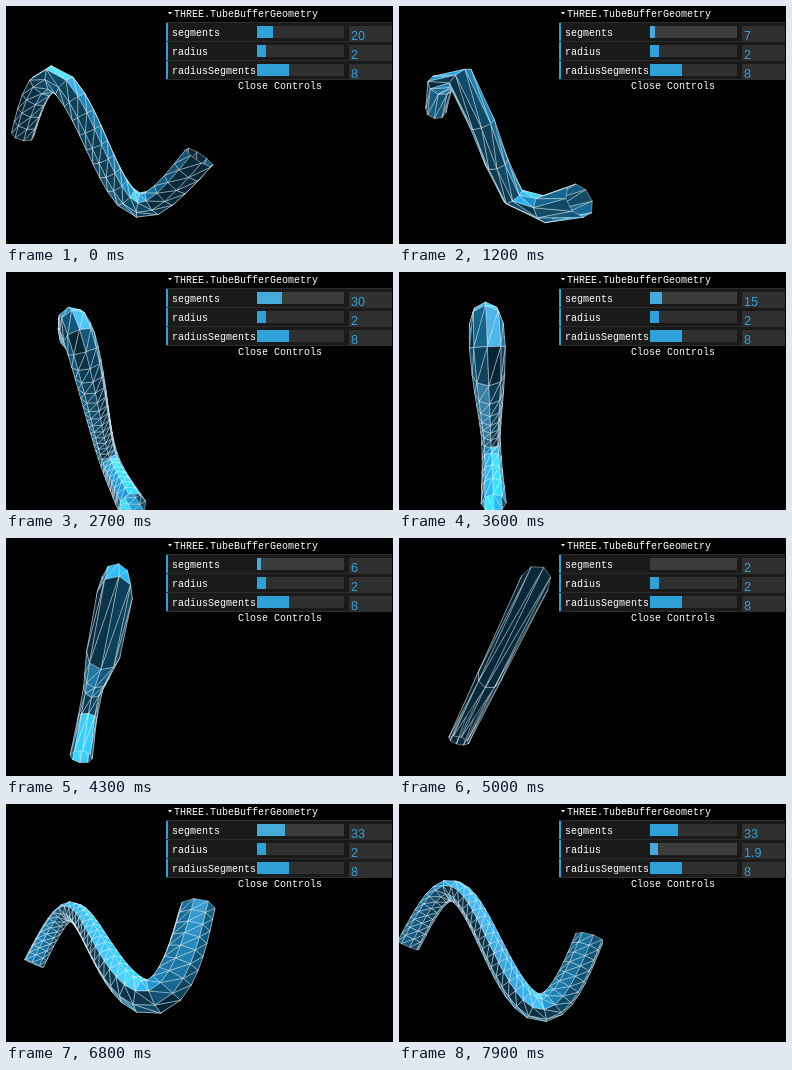
An HTML page with a canvas that plays this animation: 387 px wide and 238 px high, repeating every 8 s.

```html
<!DOCTYPE html>
<html lang="en">
<head>
<meta charset="utf-8">
<title>Tube geometry</title>
<style>
  html, body { margin: 0; width: 100%; height: 100%; overflow: hidden; background: #000; }
  canvas, svg { position: absolute; left: 0; top: 0; display: block; }
  text { font: 10px "Liberation Mono", monospace; fill: #fff; white-space: pre; }
  .value { font: 12.6px "Liberation Sans", Arial, sans-serif; fill: #2fa1d6; }
</style>
</head>
<body>
<canvas id="scene" width="387" height="238"></canvas>
<svg id="panel" width="387" height="238" viewBox="0 0 387 238"></svg>
<script>
const LOOP = 8000, STEP = 100;
const CENTER = { x: 90.8, y: 138.2 }, FOCAL = 182.7, CAMERA_Z = 30;
const START_ANGLE = -159.9, DEGREES_PER_SECOND = 18.75;
const DIFFUSE = [21, 98, 137], EMISSIVE = [7, 37, 52];
const LIGHTS = [[0, 200, 0], [100, 200, 100], [-100, -200, -100]];
const TAU = Math.PI * 2;

// [seconds, segments]
const SEGMENT_KEYS = [[0, 20], [0.3, 20], [1.2, 7], [1.9, 35], [2.4, 35], [3.6, 15],
  [4.5, 3], [4.8, 2], [5.4, 2], [6.6, 33], [8, 33]];

const ctx = document.getElementById('scene').getContext('2d');
const panel = document.getElementById('panel');

const sub = (a, b) => a.map((v, i) => v - b[i]);
const add = (a, b) => a.map((v, i) => v + b[i]);
const dot = (a, b) => a[0] * b[0] + a[1] * b[1] + a[2] * b[2];
const unit = a => {
  const length = Math.hypot(...a);
  return a.map(v => v / length);
};
const cross = (a, b) => [
  a[1] * b[2] - a[2] * b[1], a[2] * b[0] - a[0] * b[2], a[0] * b[1] - a[1] * b[0]];

function keyed(keys, t) {
  const i = Math.max(1, keys.findIndex(k => k[0] >= t));
  const [t0, v0] = keys[i - 1], [t1, v1] = keys[i];
  return v0 + (v1 - v0) * (t - t0) / (t1 - t0);
}

// Sine curve, sampled evenly by arc length
const curve = t => [30 * t - 15, 10 * Math.sin(TAU * t), 0];
const lengths = [0];
for (let i = 1; i <= 200; i++) {
  const d = sub(curve(i / 200), curve((i - 1) / 200));
  lengths.push(lengths[i - 1] + Math.hypot(...d));
}
function curveParam(u) {
  const goal = u * lengths[200];
  const i = Math.min(200, Math.max(1, lengths.findIndex(l => l >= goal)));
  return (i - 1 + (goal - lengths[i - 1]) / (lengths[i] - lengths[i - 1])) / 200;
}

function tubeRings(segments, radius, sides) {
  return Array.from({ length: segments + 1 }, (_, i) => {
    const t = curveParam(i / segments), p = curve(t);
    const [tx, ty] = unit([30, 10 * TAU * Math.cos(TAU * t), 0]);
    return Array.from({ length: sides + 1 }, (_, j) => {
      const v = j / sides * TAU, s = radius * Math.sin(v);
      return [p[0] - s * ty, p[1] + s * tx, radius * Math.cos(v)];
    });
  });
}

function rotate([x, y, z], angle) {
  const c = Math.cos(angle), s = Math.sin(angle);
  const z1 = z * c - x * s;
  return [x * c + z * s, y * c - z1 * s, y * s + z1 * c];
}

function project([x, y, z]) {
  const k = FOCAL / (CAMERA_Z - z);
  return [CENTER.x + x * k, CENTER.y - y * k];
}

function shade(normal, point, view) {
  let diffuse = 0, specular = 0;
  for (const light of LIGHTS) {
    const dir = unit(sub(light, point));
    const lambert = Math.max(0, dot(normal, dir));
    const half = Math.max(0, dot(normal, unit(add(dir, view))));
    diffuse += lambert;
    specular += 68 * lambert * half ** 30;
  }
  const rgb = DIFFUSE.map((d, i) => Math.min(255, Math.round(EMISSIVE[i] + d * diffuse + specular)));
  return `rgb(${rgb})`;
}

function makeFace(points) {
  const [a, b, c] = points;
  const mid = add(add(a, b), c).map(v => v / 3);
  const toCamera = sub([0, 0, CAMERA_Z], mid);
  let normal = unit(cross(sub(b, a), sub(c, a)));
  if (dot(normal, toCamera) < 0) normal = normal.map(v => -v);
  return {
    outline: points.map(project),
    depth: Math.hypot(...toCamera),
    color: shade(normal, mid, unit(toCamera))
  };
}

function drawTube(angle, segments, radius, sides) {
  const rings = tubeRings(segments, radius, sides).map(r => r.map(p => rotate(p, angle)));
  const faces = [];
  for (let i = 1; i <= segments; i++) {
    for (let j = 1; j <= sides; j++) {
      const a = rings[i - 1][j - 1], b = rings[i][j - 1], c = rings[i][j], d = rings[i - 1][j];
      faces.push(makeFace([a, b, d]), makeFace([b, c, d]));
    }
  }
  faces.sort((p, q) => q.depth - p.depth);

  ctx.fillStyle = '#000';
  ctx.fillRect(0, 0, 387, 238);
  ctx.lineWidth = 1;
  ctx.lineJoin = 'round';
  ctx.strokeStyle = 'rgba(255,255,255,0.38)';
  for (const { outline, color } of faces) {
    ctx.beginPath();
    outline.forEach(p => ctx.lineTo(...p));
    ctx.closePath();
    ctx.fillStyle = color;
    ctx.fill();
    ctx.stroke();
  }
}

function element(name, attrs, text = '') {
  const node = document.createElementNS('http://www.w3.org/2000/svg', name);
  for (const key in attrs) node.setAttribute(key, attrs[key]);
  node.textContent = text;
  return panel.appendChild(node);
}
const rect = (x, y, width, height, fill) => element('rect', { x, y, width, height, fill });
const label = (x, y, text) => element('text', { x, y }, text);

function makeRow(name, y, min, max) {
  rect(160, y, 226, 18, '#1a1a1a');
  rect(160, y + 18, 226, 1, '#2c2c2c');
  rect(160, y, 2, 18, '#2fa1d6');
  label(166, y + 13, name);
  const track = rect(251, y + 3, 87, 12, '#303030');
  const fill = rect(251, y + 3, 0, 12, '#2fa1d6');
  rect(343, y + 3, 43, 15, '#303030');
  const value = element('text', { x: 345, y: y + 17, class: 'value' });
  return (v, hover) => {
    fill.setAttribute('width', Math.floor(87 * (v - min) / (max - min)));
    fill.setAttribute('fill', hover ? '#44abda' : '#2fa1d6');
    track.setAttribute('fill', hover ? '#3c3c3c' : '#303030');
    value.textContent = v;
  };
}

rect(160, 0, 226, 17, '#000');
rect(160, 16, 226, 1, '#2c2c2c');
element('path', { d: 'M162 6h4l-2 2.5z', fill: '#fff' });
label(168, 11, 'THREE.TubeBufferGeometry');
const setSegments = makeRow('segments', 17, 1, 100);
const setRadius = makeRow('radius', 36, 1, 10);
const setSides = makeRow('radiusSegments', 55, 1, 20);
label(232, 83, 'Close Controls');

function render(ms) {
  const t = Math.floor(ms / STEP) * STEP / 1000;
  const segments = Math.round(keyed(SEGMENT_KEYS, t));
  const radius = t < 7.7 ? 2 : 1.9;
  const sides = 8;
  const angle = (START_ANGLE + DEGREES_PER_SECOND * t) * Math.PI / 180;
  drawTube(angle, segments, radius, sides);
  setSegments(segments, t >= 0.2 && t < 7.3);
  setRadius(radius, t >= 7.4);
  setSides(sides, false);
}

let start = null, shown = -1;
function tick(now) {
  if (start === null) start = now;
  const ms = (now - start) % LOOP;
  const step = Math.floor(ms / STEP);
  if (step !== shown) {
    shown = step;
    render(ms);
  }
  requestAnimationFrame(tick);
}
render(0);
requestAnimationFrame(tick);
</script>
</body>
</html>
```
